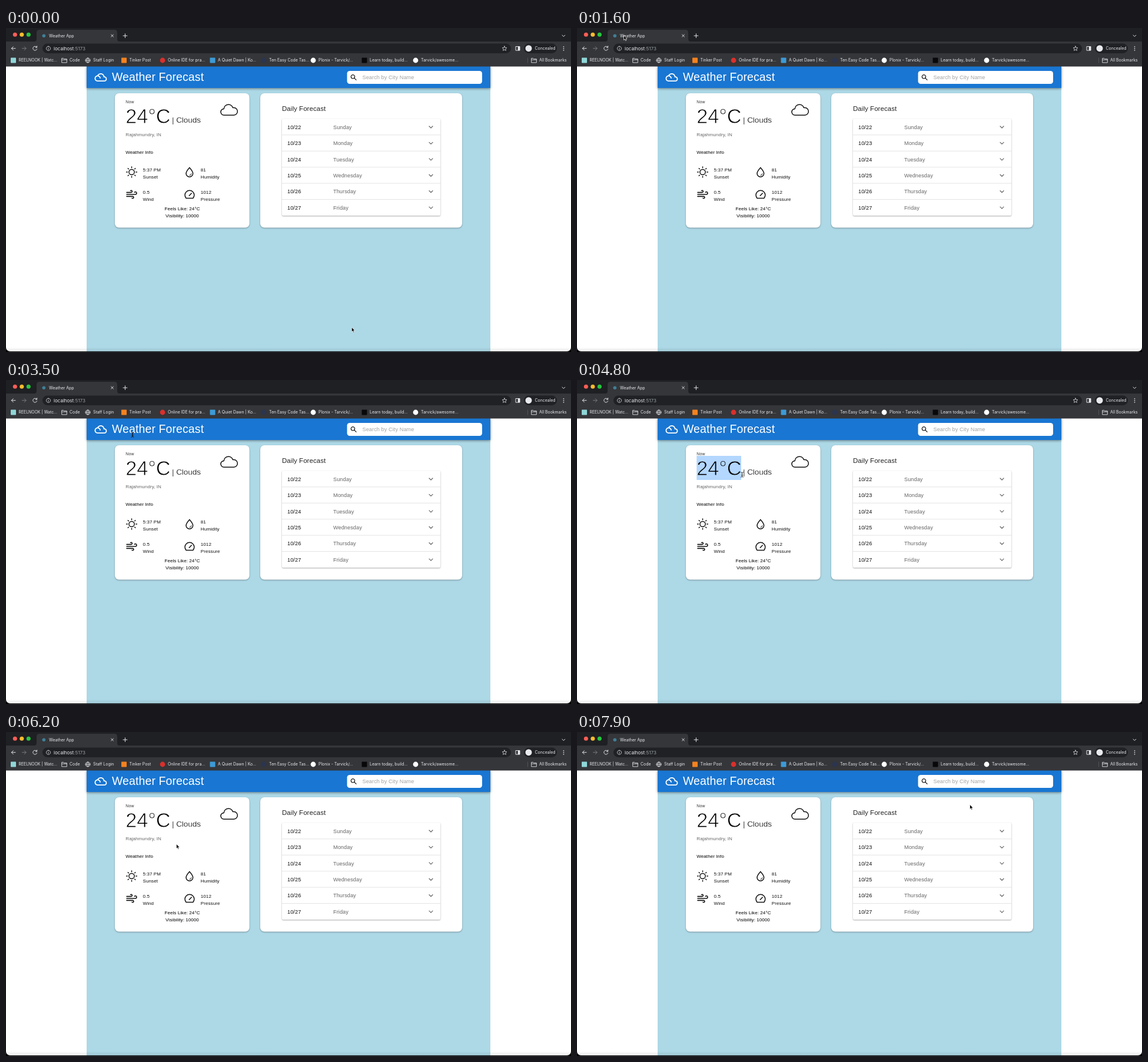
Write an HTML page that moves like this. It is 960 px wide and 551 px high and loops after 8 s.

```html
<!DOCTYPE html>
<html lang="en">
<head>
<meta charset="utf-8">
<title>Weather App</title>
<style>
html, body { margin: 0; width: 100%; height: 100%; overflow: hidden; background: #000; }
svg { display: block; }
text { font: 8px "Liberation Sans", Arial, sans-serif; letter-spacing: .01em; white-space: pre; }
.ui text { font: 6.9px Inter, sans-serif; letter-spacing: 0; fill: #e8eaed; }
.line { fill: none; stroke-linecap: round; stroke-linejoin: round; }
.row text { font-size: 9.14px; }
.thin { stroke: #fff; letter-spacing: -.004em; }
.card { fill: #fff; filter: drop-shadow(0 1px 1px #0005); }
</style>
</head>
<body>
<svg width="960" height="551" viewBox="0 0 960 551">
  <defs>
    <clipPath id="window"><path d="M0 0H960V543a7 7 0 0 1-7 7H7a7 7 0 0 1-7-7z"/></clipPath>
    <linearGradient id="edge" x2="0" y2="1">
      <stop stop-opacity="0"/><stop offset="1" stop-opacity=".1"/>
    </linearGradient>
  </defs>
  <g clip-path="url(#window)">
    <path fill="#fff" d="M0 65H960V551H0z"/>
    <path fill="#add8e6" d="M137 65H823V551H137z"/>
    <path fill="#1976d2" d="M137 65H823V102H137z" style="filter:drop-shadow(0 1.5px 2px #0007)"/>

    <!-- browser -->
    <g class="ui">
      <path fill="#1f2023" d="M0 0H960V24H0z"/>
      <path fill="#35363a" d="M0 23H48q4 0 4-4V8q0-5 5-5H184q5 0 5 5V19q0 4 4 4H960V65.5H0z"/>
      <circle cx="15.3" cy="11.3" r="3.5" fill="#ff5f57"/>
      <circle cx="26.8" cy="11.3" r="3.5" fill="#febc2e"/>
      <circle cx="38.3" cy="11.3" r="3.5" fill="#28c840"/>
      <circle cx="64.3" cy="13.2" r="2.8" fill="#3f7f96"/>
      <text x="73" y="15.5">Weather App</text>
      <rect x="62" y="26.5" width="796" height="16.5" rx="8.2" fill="#202124"/>
      <rect x="880" y="26.5" width="56" height="16.5" rx="8.2" fill="#202124"/>
      <circle cx="888" cy="34.7" r="5.5" fill="#e8eaed"/>
      <text x="898.5" y="37.4">Concealed</text>
      <text x="81" y="37.6" style="font-size:8px">localhost<tspan fill="#9aa0a6">:5173</tspan></text>
      <g class="line" stroke="#e0e2e6">
        <path d="M178.6 11.2l3.8 3.8m0-3.8l-3.8 3.8M199 13.2h6.8m-3.4-3.4v6.8M945 12.2l2.4 2.3 2.4-2.3M16 34.7H9.3m3-3l-3 3 3 3"/>
        <path stroke="#77797d" d="M27.5 34.7h6.7m-3-3l3 3-3 3"/>
        <path d="M52 32.4a3.5 3.5 0 1 0 .6 3.4M52.6 30.7v2.4h-2.4"/>
        <path stroke-width=".8" d="M72 31.1a3.6 3.6 0 1 0 .01 0M72 34.4v2M72 32.7v.1"/>
        <path stroke-width=".8" d="M847 30.9l1.1 2.5 2.7.3-2 1.9.6 2.7-2.4-1.4-2.4 1.4.6-2.7-2-1.9 2.7-.3z"/>
        <path d="M866.4 31.5h6.6v6.6h-6.6z"/>
        <path stroke-width="1.7" d="M947.5 31.8v0m0 3v0m0 3v0"/>
      </g>
      <path fill="#e8eaed" d="M869.8 31.5h3.2v6.6h-3.2z"/>
      <path stroke="#5f6368" stroke-width=".7" d="M886.5 50.5v9"/>
      <g id="marks"></g>
    </g>

    <!-- header -->
    <path fill="#fff" transform="translate(150.5 73.6) scale(.87)" d="M19.35 10.04C18.67 6.59 15.64 4 12 4 9.11 4 6.61 5.64 5.36 8.04 2.35 8.36 0 10.9 0 14c0 3.31 2.69 6 6 6h13c2.76 0 5-2.24 5-5 0-2.64-2.05-4.78-4.65-4.96zM19 18H6c-2.21 0-4-1.79-4-4s1.79-4 4-4 4 1.79 4 4h2c0-2.76-1.86-5.08-4.4-5.78C8.61 6.88 10.2 6 12 6c3.03 0 5.5 2.47 5.5 5.5v.5H19c1.65 0 3 1.35 3 3s-1.35 3-3 3z"/>
    <text x="180" y="90.3" fill="#fff" style="font-size:19.43px;letter-spacing:.007em">Weather Forecast</text>
    <rect x="579.5" y="73" width="229.5" height="22" rx="4.5" fill="#fff"/>
    <path class="line" stroke="#111" stroke-width="1.2" d="M589.4 79.6a3.2 3.2 0 1 0 .01 0M591.8 85.2l3.2 3.2"/>
    <text x="605.5" y="87.2" fill="#a2a2a2" style="font-size:9.14px">Search by City Name</text>

    <!-- current weather -->
    <rect class="card" x="185" y="111" width="228.6" height="228.5" rx="7"/>
    <rect id="selection" x="203.3" y="129" width="75.7" height="41" fill="#b3d7fe"/>
    <text x="203.3" y="127.6" fill="#333" style="font-size:6.86px;letter-spacing:.033em">Now</text>
    <text id="degrees" class="thin" x="203.3" y="161.7" stroke-width=".9" style="font-size:34.28px">24°C</text>
    <text class="thin" x="282" y="161.4" stroke-width=".25" style="font-size:13.5px">| Clouds</text>
    <text x="203.3" y="183.8" fill="#666">Rajahmundry, IN</text>
    <text x="203.3" y="213.9">Weather Info</text>
    <g id="info"></g>
    <g text-anchor="middle">
      <text x="299.5" y="310.4">Feels Like: 24°C</text>
      <text x="299.5" y="322.3">Visibility: 10000</text>
    </g>
    <g class="line" stroke="#111" stroke-width="1.5">
      <path d="M370.5 148.2a5.4 5.4 0 0 1-.3-10.8A7.8 7.8 0 0 1 385.4 135.6A6.4 6.4 0 1 1 386.5 148.2z"/>
      <g transform="translate(213.5 245)">
        <circle r="4.6"/>
        <path d="M0-8.9v1.6M0 7.3v1.6M-8.9 0h1.6M7.3 0h1.6M-6.3-6.3l1.1 1.1M5.2 5.2l1.1 1.1M-6.3 6.3l1.1-1.1M5.2-5.2l1.1-1.1"/>
      </g>
      <path d="M311.8 237.4c-2.5 3-5.8 6.4-5.8 10a5.8 5.8 0 0 0 11.6 0c0-3.6-3.3-7-5.8-10z"/>
      <path stroke-width="1" d="M312 250.6a3 3 0 0 0 2.9-2.8"/>
      <path stroke-width="1.9" transform="translate(203.3 272.8) scale(.85)" d="M9.6 4.6A2 2 0 1 1 11 8H2m10.6 11.4A2 2 0 1 0 14 16H2m15.7-8.3A2.5 2.5 0 1 1 19.5 12H2"/>
      <path d="M306 289.4a7.9 7.9 0 1 1 11.8 0zM311.2 285.2l4-4.2"/>
    </g>

    <!-- daily forecast -->
    <rect class="card" x="432" y="111" width="343" height="228.5" rx="7"/>
    <text x="469" y="140.6" style="font-size:11.43px;letter-spacing:.0075em" fill="#222">Daily Forecast</text>
    <rect class="card" x="469" y="154.3" width="269" height="164.8" rx="2"/>
    <g id="days" class="row"></g>

    <path fill="url(#edge)" d="M0 543H960V551H0z"/>
  </g>
  <g id="pointer">
    <circle id="ring" r="12.4" fill="#fff" fill-opacity=".5" stroke="#111" stroke-width="1.2"/>
    <path id="arrow" stroke="#fff" stroke-width=".7" d="M0 0V8L1.8 6.4 3 9.2 4.3 8.6 3.1 5.9H5.5z"/>
    <g id="beam" class="line">
      <path id="halo" stroke="#fff" stroke-width="1.8" d="M-2-4.2q2 0 2 1.2V3q0 1.2-2 1.2M2-4.2q-2 0-2 1.2V3q0 1.2 2 1.2M-1 1H1"/>
      <path stroke="#111" stroke-width=".8" d="M-2-4.2q2 0 2 1.2V3q0 1.2-2 1.2M2-4.2q-2 0-2 1.2V3q0 1.2 2 1.2M-1 1H1"/>
    </g>
  </g>
</svg>
<script>
const $ = id => document.getElementById(id);
const text = (x, y, s, fill = '#111') => `<text x="${x}" y="${y}" fill="${fill}">${s}</text>`;

// Bookmark icons: s square, c circle, f folder, g globe.
const icons = {
  s: (x, c) => `<rect x="${x - 4.5}" y="50.5" width="9" height="9" rx=".8" fill="${c}"/>`,
  c: (x, c) => `<circle cx="${x}" cy="55" r="4.4" fill="${c}"/>`,
  f: (x, c) => `<path class="line" stroke="${c}" stroke-width=".9" d="M${x - 4.3} 58.5v-7h3l1 1.2h4.6v5.8zm0-4.4h8.6"/>`,
  g: (x, c) => `<path class="line" stroke="${c}" stroke-width=".9" d="M${x} 51a4 4 0 1 0 .01 0q-3.6 4 0 8q3.6-4 0-8M${x - 4} 55h8"/>`
};
const marks = [
  [12.5, 21.5, 's', '#8fd6d8', 'REELNOOK | Watc...'],
  [99, 108, 'f', '#dfe1e5', 'Code'],
  [139, 148, 'g', '#dfe1e5', 'Staff Login'],
  [200.5, 209.5, 's', '#f58220', 'Tinker Post'],
  [266, 275, 'c', '#d9302c', 'Online IDE for pra...'],
  [351, 360, 's', '#3d9bd6', 'A Quiet Dawn | Ko...'],
  [438, 447, 'c', '#2b3550', 'Ten Easy Code Tas...'],
  [522, 531, 'c', '#fff', 'Plonix - Tarvick/...'],
  [609, 618, 's', '#08080a', 'Learn today, build...'],
  [696, 705, 'c', '#fff', 'Tarvick/awesome...'],
  [897, 906, 'f', '#dfe1e5', 'All Bookmarks']
];
$('marks').innerHTML = marks.map(([ix, x, kind, c, s]) => icons[kind](ix, c) + text(x, 57.4, s)).join('');

$('info').innerHTML = [
  [232.6, 244.3, '5:37 PM', 'Sunset'], [330.8, 244.3, '81', 'Humidity'],
  [232.6, 281.7, '0.5', 'Wind'], [330.8, 281.7, '1012', 'Pressure']
].map(([x, y, a, b]) => text(x, y, a) + text(x, y + 12, b)).join('');

$('days').innerHTML = ['Sunday', 'Monday', 'Tuesday', 'Wednesday', 'Thursday', 'Friday'].map((day, i) => {
  const y = 168.3 + i * 27.43;
  return text(478, y + 3.4, '10/' + (22 + i)) + text(556, y + 3.4, day, '#666') +
    `<path class="line" stroke="#666" stroke-width="1.2" d="M719 ${y - 1.3}l3 3 3-3"/>` +
    (i ? `<path stroke="#ddd" stroke-width=".8" d="M469 ${y - 13.9}h269"/>` : '');
}).join('');

// Pointer path: time, x, y.
const path = [
  [0, 587.3, 508.8], [900, 348, 74], [1300, 20, 4], [1600, 79.5, 12.5], [1800, 80, 14],
  [2100, 165, 96], [2400, 343, 92], [2700, 160, 118], [2900, 92, 56], [3200, 180, 93],
  [3500, 215, 93], [3600, 448, 173], [3900, 300, 208], [4100, 205, 150], [4500, 279, 160],
  [4600, 279, 160], [4700, 280.5, 161], [4800, 280.5, 161], [5200, 203, 180], [5300, 204, 176],
  [5500, 204, 176], [5900, 280, 165], [6000, 282, 166], [6100, 282, 166], [6500, 330, 322],
  [6900, 407, 225.3], [7000, 618, 205], [7300, 697, 160], [7600, 640, 130], [7800, 667, 122.5],
  [7900, 667.5, 123.3]
];
// Places where the pointer becomes a text cursor: x, y, width, height.
const zones = [[180, 72, 157, 25], [203, 129, 128, 41], [203, 177, 62, 10], [203, 206, 48, 11], [469, 130, 75, 14]];

function pose(t) {
  const i = Math.max(1, path.findIndex(p => p[0] >= t));
  const [a, b] = [path[i - 1], path[i]];
  const u = (t - a[0]) / (b[0] - a[0]);
  const e = u * u * (3 - 2 * u);
  return [a[1] + (b[1] - a[1]) * e, a[2] + (b[2] - a[2]) * e];
}

const show = (id, on) => $(id).setAttribute('visibility', on ? 'visible' : 'hidden');

function draw(now) {
  const t = Math.floor(now % 8000 / 100) * 100;
  const [x, y] = pose(t);
  const typing = zones.some(([l, top, w, h]) => x >= l && x <= l + w && y >= top && y <= top + h);
  const first = t >= 4200 && t < 5200, second = t >= 5600 && t < 6200;
  const selected = first || second;
  $('pointer').setAttribute('transform', `translate(${x} ${y})`);
  show('arrow', !typing);
  show('beam', typing);
  show('halo', typing && y > 102 && !selected);
  show('ring', t >= 4100 && t < 4500 || t >= 5500 && t < 5900);
  show('selection', selected);
  $('selection').setAttribute('width', Math.min(75.7, Math.max(0, x - 203.3)) * selected || (selected ? 1 : 0));
  if (t >= 4500 && first) $('selection').setAttribute('width', 75.7);
  $('degrees').style.stroke = selected && x > 240 || t >= 4500 && first ? '#b3d7fe' : '#fff';
  requestAnimationFrame(draw);
}
requestAnimationFrame(draw);
</script>
</body>
</html>
```
